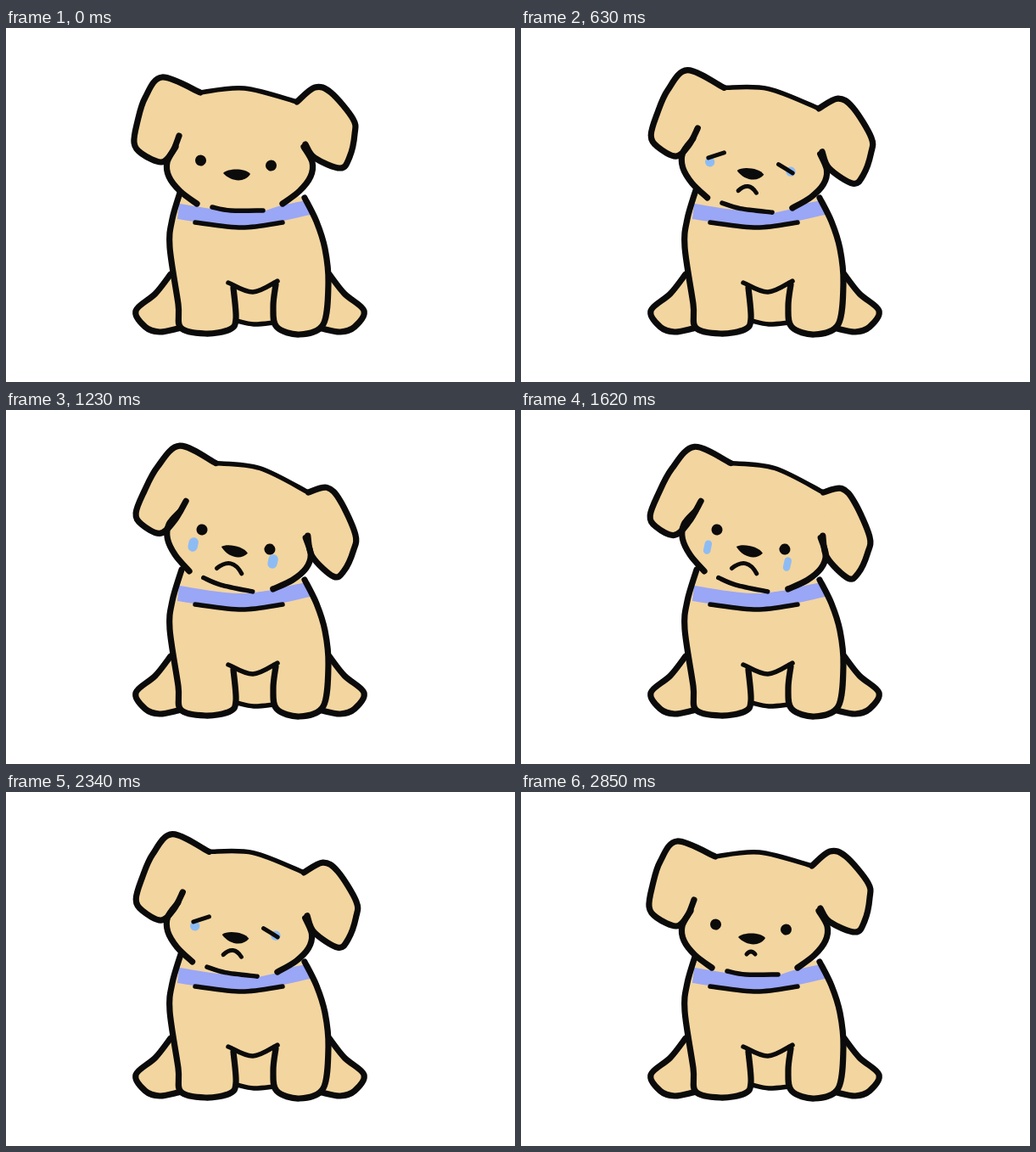
An HTML page with a canvas that plays this animation: 600x417 px, repeating every 2.97 s.

```html
<!DOCTYPE html>
<html lang="en">
<head>
<meta charset="utf-8">
<title>Sad puppy</title>
<style>
  html, body { margin: 0; width: 100%; height: 100%; overflow: hidden; background: #fff; }
  canvas { display: block; width: 600px; height: 417px; }
</style>
</head>
<body>
<canvas id="stage" width="600" height="417"></canvas>
<script>
const ctx = document.getElementById('stage').getContext('2d');
const FUR = '#f3d59f', INK = '#0b0b0b', COLLAR = '#9aa6f6', TEAR = '#8dbcf5';
const LOOP = 2970, STEPS = 24, PAUSES = [3, 12, 19];
const OUTLINE = 7.2, THIN = 5.5, DEG = Math.PI / 180;

// Body, in stage coordinates
const haunch = [194,290, 176,313, 153,333, 164,352, 181,358, 203,354];
const leftSide = [207,188, 196,225, 193,258, 203,325, 206,353, 235,360, 264,355, 271,342, 268,306];
const rightSide = [352,200, 366,228, 376,260, 380,300, 374,349, 346,361, 319,352, 315,328, 318,302];
const chest = [262,300, 291,311, 320,298];
const belly = [272,345, 292,349, 316,347];
const collar = [203,216, 281,225, 358,211];
const collarLine = [223,229, 278,235, 326,229];

// Head, relative to the point between the eyes
const leftEar = [-42,-83, -87,-101, -107,-77, -116,-49, -120,-24, -111,-11, -88,-1, -75,-13, -67,-32];
const rightEar = [72,-72, 93,-89, 112,-83, 138,-52, 140,-34, 134,-7, 123,6, 93,-6, 82,-22];
const crown = [-42,-83, 10,-88, 72,-72];
const cheek = [-71,-19, -81,-1, -79,16, -66,33, -46,48];
const chin = [-28,52, -6,56, 32,56];

const clamp = v => Math.min(1, Math.max(0, v));
const bump = (k, peak, width) => clamp(1 - Math.abs(k - peak) / width);
const mirror = (p, sum) => p.map((v, i) => i % 2 ? v : sum - v);
const reversed = p => p.map((_, i) => p[p.length - 2 - i + 2 * (i % 2)]);

// Ears hang from both ends, so the middle drops most.
function droopEar(p, sag) {
  return p.map((v, i) => {
    const pull = sag * Math.sin(Math.PI * (i >> 1) / (p.length / 2 - 1));
    return v + (i % 2 ? pull : -0.1 * pull);
  });
}

// Adds a Catmull-Rom curve to the current path.
function curve(p, join) {
  const last = p.length / 2 - 1;
  const at = i => { i = 2 * Math.min(last, Math.max(0, i)); return [p[i], p[i + 1]]; };
  join ? ctx.lineTo(p[0], p[1]) : ctx.moveTo(p[0], p[1]);
  for (let i = 0; i < last; i++) {
    const [a, b, c, d] = [at(i - 1), at(i), at(i + 1), at(i + 2)];
    ctx.bezierCurveTo(
      b[0] + (c[0] - a[0]) / 6, b[1] + (c[1] - a[1]) / 6,
      c[0] - (d[0] - b[0]) / 6, c[1] - (d[1] - b[1]) / 6, c[0], c[1]);
  }
}

// The thin rim hides seams between neighbouring fills.
function fill(...parts) {
  ctx.beginPath();
  parts.forEach((p, i) => curve(p, i > 0));
  ctx.closePath();
  ctx.fillStyle = ctx.strokeStyle = FUR;
  ctx.lineWidth = 2;
  ctx.fill();
  ctx.stroke();
}

function line(p, width = OUTLINE, color = INK, cap = 'round') {
  ctx.beginPath();
  curve(p);
  ctx.lineCap = cap;
  ctx.lineWidth = width;
  ctx.strokeStyle = color;
  ctx.stroke();
}

// A round-ended stroke around a centre; with no length it is a dot.
function capsule(x, y, half, angle, width, color) {
  if (width <= 0) return;
  const dx = (half + 0.01) * Math.cos(angle), dy = (half + 0.01) * Math.sin(angle);
  line([x - dx, y - dy, x + dx, y + dy], width, color);
}

function drawBody() {
  const haunches = [haunch, mirror(haunch, 575)];
  haunches.forEach(p => fill(p));
  fill(chest, reversed(belly));
  fill(leftSide, chest, reversed(rightSide));
  line(collar, 18, COLLAR, 'butt');
  [...haunches, leftSide, rightSide].forEach(p => line(p));
  [chest, belly, collarLine].forEach(p => line(p, THIN));
}

function drawFace(k, tilt, droop) {
  for (const side of [-1, 1]) {
    const tearY = 10 * tilt + 9.5 * droop;
    const tearWidth = 17 * clamp((k - 3) / 3) - 8.5 * droop;
    capsule(side * 48, tearY, 4 * droop, 90 * DEG, tearWidth, TEAR);
    capsule(side * 41.5, side * 3, 13 * bump(k, 6, 4), side * 25 * DEG, 13 - 8 * bump(k, 5, 3), INK);
  }

  ctx.beginPath();
  ctx.moveTo(-15, 12);
  ctx.bezierCurveTo(-9, 6, 11, 6, 17, 13);
  ctx.bezierCurveTo(11, 23, -5, 23, -15, 12);
  ctx.fillStyle = INK;
  ctx.fill();

  if (k > 0) {
    const w = 5 + 10 * tilt, h = 3 + 6 * tilt;
    ctx.beginPath();
    ctx.moveTo(-w, 29 + h);
    ctx.quadraticCurveTo(0, 29 - h, w, 29 + h);
    ctx.lineWidth = 5;
    ctx.strokeStyle = INK;
    ctx.stroke();
  }
}

function drawHead(k) {
  const tilt = clamp((k - 1) / 7), droop = clamp((k - 8) / 3);
  const sag = 12 * tilt + 9 * droop;
  const earL = droopEar(leftEar, sag), earR = droopEar(rightEar, sag);
  const cheekR = mirror(cheek, 9);

  ctx.save();
  ctx.translate(271, 159 - 6.5 * tilt ** 3);
  ctx.rotate(12 * DEG * tilt);
  fill(earL);
  fill(earR);
  fill(crown, earR.slice(-2), cheekR, reversed(chin), reversed(cheek), earL.slice(-2));
  [earL, earR, cheek, cheekR].forEach(p => line(p));
  [crown, chin].forEach(p => line(p, THIN));
  drawFace(k, tilt, droop);
  ctx.restore();
}

// The second half of the loop retraces the first.
function draw(step) {
  ctx.fillStyle = '#fff';
  ctx.fillRect(0, 0, 600, 417);
  ctx.lineJoin = 'round';
  drawBody();
  drawHead(Math.min(step, STEPS - step));
}

const startOf = i => 120 * i + 30 * PAUSES.filter(p => i > p).length;

function tick() {
  const t = performance.now() % LOOP;
  let step = 0;
  while (step < STEPS - 1 && startOf(step + 1) <= t) step++;
  draw(step);
  requestAnimationFrame(tick);
}
tick();
</script>
</body>
</html>
```
